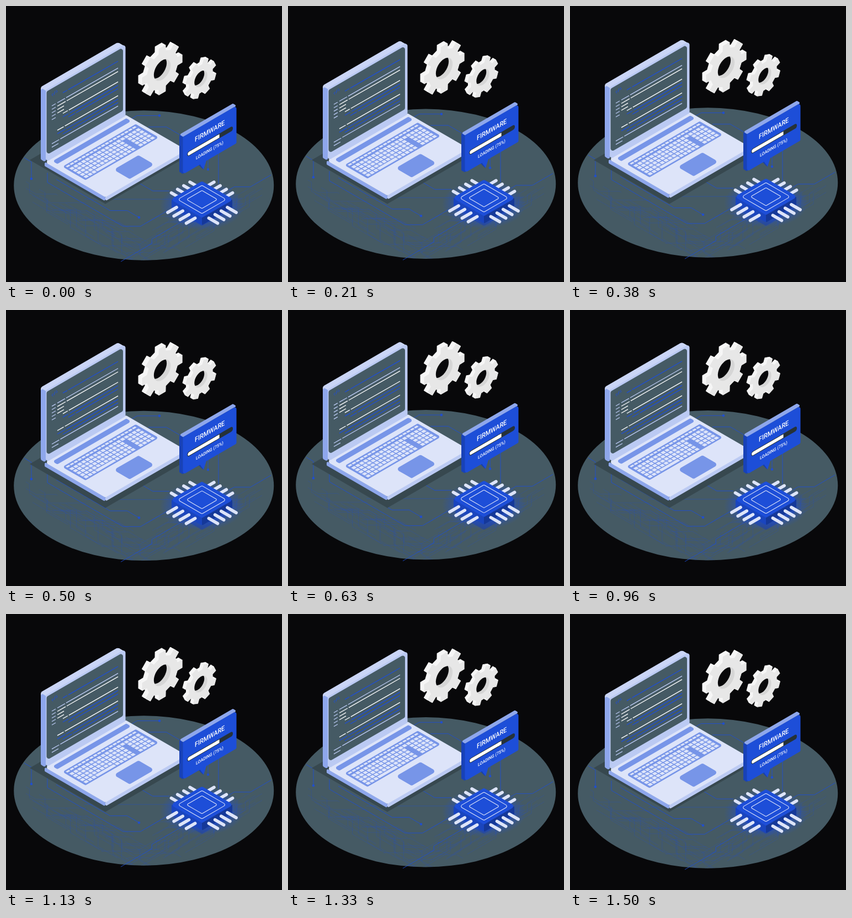
An HTML page with a canvas that plays this animation: 500 by 500 pixels, repeating every 1540 ms.

```html
<!DOCTYPE html>
<html lang="en">
<head>
<meta charset="utf-8">
<title>Firmware loading</title>
<style>
  html, body { margin: 0; width: 100%; height: 100%; overflow: hidden; background: #08080a; }
  canvas { display: block; width: 500px; height: 500px; }
</style>
</head>
<body>
<canvas id="stage" width="500" height="500"></canvas>
<script>
const ctx = document.getElementById('stage').getContext('2d');
const BLUE = '#1d4ed8', PALE = '#dde4f9', LIGHT = '#cad5f6', SOFT = '#bbcaf3';
const MID = '#8ea7ec', DEEP = '#7795e8', SLATE = '#455a64', BACK = '#08080a', WHITE = '#fff';
const LOOP = 1540, FLOAT = 1500, STEPS = 36, LIFT = 10;

// Isometric axes
const SLOPE = 0.58;
const RISE = [1, -SLOPE], FALL = [1, SLOPE], DROP = [0, 1];

function polygon(points, radius = 0) {
  const last = points[points.length - 1], [first] = points;
  ctx.beginPath();
  ctx.moveTo((last[0] + first[0]) / 2, (last[1] + first[1]) / 2);
  points.forEach(([x, y], i) => {
    const next = points[(i + 1) % points.length];
    ctx.arcTo(x, y, next[0], next[1], radius);
  });
  ctx.closePath();
}

function fill(color, points, radius) {
  polygon(points, radius);
  ctx.fillStyle = color;
  ctx.fill();
}

function stroke(color, width) {
  ctx.strokeStyle = color;
  ctx.lineWidth = width;
  ctx.stroke();
}

function line(color, width, ...points) {
  ctx.beginPath();
  points.forEach(([x, y]) => ctx.lineTo(x, y));
  stroke(color, width);
}

// Corners of a parallelogram spanned by two axes
function face(x, y, [ax, ay], a, [bx, by], b) {
  return [
    [x, y],
    [x + ax * a, y + ay * a],
    [x + ax * a + bx * b, y + ay * a + by * b],
    [x + bx * b, y + by * b]
  ];
}

const wall = (color, x, y, w, h, r) => fill(color, face(x, y, RISE, w, DROP, h), r);
const side = (color, x, y, w, h, r) => fill(color, face(x, y, FALL, w, DROP, h), r);
const plate = (color, x, y, w, d, r) => fill(color, face(x, y, RISE, w, FALL, d), r);

function dot(x, y, r, color) {
  ctx.beginPath();
  ctx.arc(x, y, r, 0, 7);
  ctx.fillStyle = color;
  ctx.fill();
}

function onWall(x, y, draw) {
  ctx.save();
  ctx.transform(0.866, -0.866 * SLOPE, 0, 1, x, y);
  draw();
  ctx.restore();
}

function seeded(seed) {
  return () => (seed = (seed * 16807) % 2147483647) / 2147483647;
}

// A diagonal run with one straight piece; split is the diagonal share before it
function wire(color, x1, y1, x2, y2, split, node) {
  const dx = x2 - x1, dy = y2 - y1;
  const run = Math.min(Math.abs(dx), Math.abs(dy) / SLOPE);
  const diagonal = [Math.sign(dx) * run, Math.sign(dy) * run * SLOPE];
  const before = [x1 + diagonal[0] * split, y1 + diagonal[1] * split];
  const after = [x2 - diagonal[0] * (1 - split), y2 - diagonal[1] * (1 - split)];
  line(color, 1, [x1, y1], before, after, [x2, y2]);
  if (node) dot(x2, y2, 2.3, color);
}

function drawFloor() {
  const bright = 'rgba(29,78,216,.85)', faint = 'rgba(29,78,216,.24)';
  ctx.save();
  ctx.beginPath();
  ctx.ellipse(249.7, 325, 235.5, 135.7, 0, 0, 7);
  ctx.fillStyle = SLATE;
  ctx.fill();
  ctx.clip();
  const rand = seeded(77);
  for (let i = 0; i < 16; i++) {
    const shift = i * 12;
    for (const mirror of [-1, 1]) {
      const x = 250 + mirror * (214 - shift), y = 318 + shift * 0.45 + rand() * 20;
      const reach = 35 + rand() * 45;
      wire(faint, x, y, x - mirror * reach, y + reach * SLOPE + 12 + rand() * 25, rand() * 0.5);
      wire(faint, x, y + 12, x - mirror * reach * 1.4, y + 24 + rand() * 20, rand());
    }
  }
  ctx.restore();
  wire(bright, 208, 463, 325, 387, 0.48);
  wire(bright, 75, 302, 212, 399, 0);
  wire(bright, 212, 399, 292, 371, 0);
  wire(bright, 33, 275, 46, 313, 1, true);
  wire(bright, 91, 314, 241, 383, 0.82, true);
  wire(bright, 240, 320, 296, 335, 1);
  wire(bright, 228, 204, 278, 198.5, 1, true);
  wire(bright, 258, 219, 318, 235, 0);
  wire(bright, 366, 278, 366, 296, 0, true);
  wire(bright, 385, 262, 385, 322, 0);
  wire(bright, 404, 333, 480, 306, 0.2);
  wire('rgba(29,78,216,.4)', 142, 350, 300, 350, 0);
}

function drawShadows() {
  plate('#37484f', 43, 279, 150, 137);
  plate('rgba(24,60,170,.55)', 299, 366, 56, 56, 4);
}

function drawKeyboard() {
  const key = (u, v, w, h) => plate(PALE, 102 + u + v, 291 + (v - u) * SLOPE, w, h);
  plate(DEEP, 102, 291, 133, 42, 3);
  for (let row = 0; row < 6; row++) {
    for (let col = 0; col < 18; col++) {
      const gap = col === 13 && row > 1;
      const underSpace = row === 5 && col > 2 && col < 8;
      if (!gap && !underSpace) key(3.5 + col * 7.05, 2.5 + row * 6.4, 5.6, row ? 4.9 : 3.2);
    }
  }
  key(24.6, 34.5, 33.8, 4.9);
}

function drawCode() {
  // One character per row: colour, then indent level
  const colors = 'b swwwwbb wbbss', indents = '2 111122311200';
  const ink = { b: BLUE, s: SOFT, w: WHITE };
  const levels = [...'2-1111223-11200'];
  const rand = seeded(5);
  [...colors].forEach((name, row) => {
    if (name === ' ') return;
    const dash = (color, from, to) => line(color, 1.3,
      ...[from, to].map(x => [x, 168.5 + row * 6.24 - (x - 83) * SLOPE * 0.985]));
    const start = 83 + levels[row] * 10;
    const short = row === 4 || row === 5 || row === 14;
    const gap = start + 8 + rand() * 9;
    if (row > 1 && row < 7) dash(SOFT, 83, 90);
    dash(ink[name], start, short ? start + 12 : gap);
    if (!short) dash(ink[name], gap + 2, 203);
  });
  const bracket = (x, y, dx) => line(BLUE, 1, [x + dx, y - 3], [x, y], [x + dx, y + 2]);
  bracket(83, 161, 2.5);
  bracket(93, 155, -2.5);
  line(BLUE, 1, [87, 161], [89, 154]);
}

function drawLaptop() {
  side(MID, 70, 282, 110, 8, 2);
  wall(SOFT, 180, 345.5, 147, 8, 2);
  plate(PALE, 70, 282.5, 147, 110, 4);
  plate(DEEP, 84, 281, 134, 9, 3);
  drawKeyboard();
  plate(DEEP, 195, 296.5, 45, 29, 4);

  for (let d = 9; d > 0; d -= 0.5) wall(LIGHT, 72 - d, 152 - d * SLOPE, 144.5, 131, 5);
  side(MID, 63, 148, 9.5, 130, 3);
  wall(SOFT, 72, 152, 144.5, 131, 4);
  wall(SLATE, 73.5, 155, 138.5, 115, 4);
  drawCode();
}

function drawGear(cx, cy, radius, turn) {
  const project = (r, a, depth) => [
    cx + 0.866 * r * Math.cos(a) - depth,
    cy - 0.5 * r * Math.cos(a) + r * Math.sin(a) - depth * SLOPE
  ];
  const contour = (count, depth, radiusAt) => Array.from({ length: count }, (_, i) => {
    const [scale, offset] = radiusAt(i % 4);
    return project(radius * scale, turn + Math.floor(i / 4) * Math.PI / 4 + offset, depth);
  });
  const toothed = depth => contour(32, depth, corner =>
    corner % 3 ? [1, corner === 1 ? -0.17 : 0.17] : [0.77, corner ? 0.23 : -0.23]);
  const ring = depth => contour(32, depth, corner => [0.41, corner * Math.PI / 16]);
  const thickness = radius * 0.165;
  for (let depth = thickness; depth > 0; depth -= 0.5) fill('#f6f6f6', toothed(depth));
  fill('#e7e7e7', toothed(0));
  ctx.save();
  fill('#d6d6d6', ring(0));
  ctx.clip();
  fill(BACK, ring(thickness));
  ctx.restore();
}

// A row of four pins; dirX and dirY say which way each pin leaves the chip
function drawPins(x, y, dirX, dirY, length, stepX, stepY) {
  ctx.lineCap = 'round';
  for (let i = 0; i < 4; i++) {
    const px = x + i * stepX, py = y + i * stepY;
    line(PALE, 5.7, [px, py], [px + dirX * length, py + dirY * length * SLOPE]);
  }
  ctx.lineCap = 'butt';
}

function drawChip() {
  ctx.save();
  ctx.translate(355, 362);
  ctx.scale(1, SLOPE);
  const glow = ctx.createRadialGradient(0, 0, 30, 0, 0, 76);
  glow.addColorStop(0, 'rgba(29,78,216,.8)');
  glow.addColorStop(0.6, 'rgba(29,78,216,.35)');
  glow.addColorStop(1, 'rgba(29,78,216,0)');
  dot(0, 0, 76, glow);
  ctx.restore();

  for (const dir of [-1, 1]) drawPins(355 + dir * 55.5, 338.5, -dir, 1, 14, -dir * 11.2, -6.5);
  side('#1a45be', 300, 350, 55, 15, 1);
  wall('#153899', 355, 382, 55, 15, 1);
  plate(BLUE, 298, 350.5, 57, 57, 4);
  for (const size of [44, 28]) {
    polygon(face(355 - size, 350.5, RISE, size, FALL, size), size / 16);
    stroke(PALE, 1.1);
  }
  for (const dir of [-1, 1]) drawPins(355 + dir * 62, 374, -dir, -1, 16, -dir * 11.2, 6.5);
}

function label(text, x, y, size) {
  onWall(x, y, () => {
    ctx.font = `500 ${size}px Roboto, sans-serif`;
    ctx.fillStyle = WHITE;
    ctx.fillText(text, 0, 0);
  });
}

function drawBubble() {
  fill('#173eac', [[347, 286], [353, 283], [358, 296], [355, 294]]);
  fill(BLUE, [[350, 285], [364, 277], [358, 296]]);
  side('#1842b7', 314, 232.5, 8, 68, 2);
  plate(MID, 314, 233, 97, 7, 2);
  wall(BLUE, 320.5, 237, 97, 68, 3);
  label('FIRMWARE', 342, 246.5, 12.4);
  onWall(332, 267, () => {
    ctx.lineCap = 'round';
    line('#263238', 8.6, [0, 0], [87, 0]);
    line(WHITE, 6.4, [0, 0], [58, 0]);
    ctx.lineCap = 'butt';
    line(WHITE, 6.4, [56, 0], [63, 0]);
  });
  label('LOADING (75%)', 344, 278.5, 8.2);
}

function render(now) {
  const step = Math.min(STEPS, Math.floor((now % LOOP + 5) / (FLOAT / STEPS)));
  const lift = LIFT * (1 - Math.abs(1 - 2 * step / STEPS));
  const floating = (...parts) => {
    ctx.save();
    ctx.translate(0, -lift);
    parts.forEach(draw => draw());
    ctx.restore();
  };
  ctx.fillStyle = BACK;
  ctx.fillRect(0, 0, 500, 500);
  floating(drawFloor);
  drawShadows();
  floating(drawLaptop, drawChip, drawBubble,
    () => drawGear(283, 116, 42.7, 0),
    () => drawGear(353, 132, 33, Math.PI / 9));
}

const start = performance.now();
function loop() {
  render(performance.now() - start);
  requestAnimationFrame(loop);
}
loop();
</script>
</body>
</html>
```
